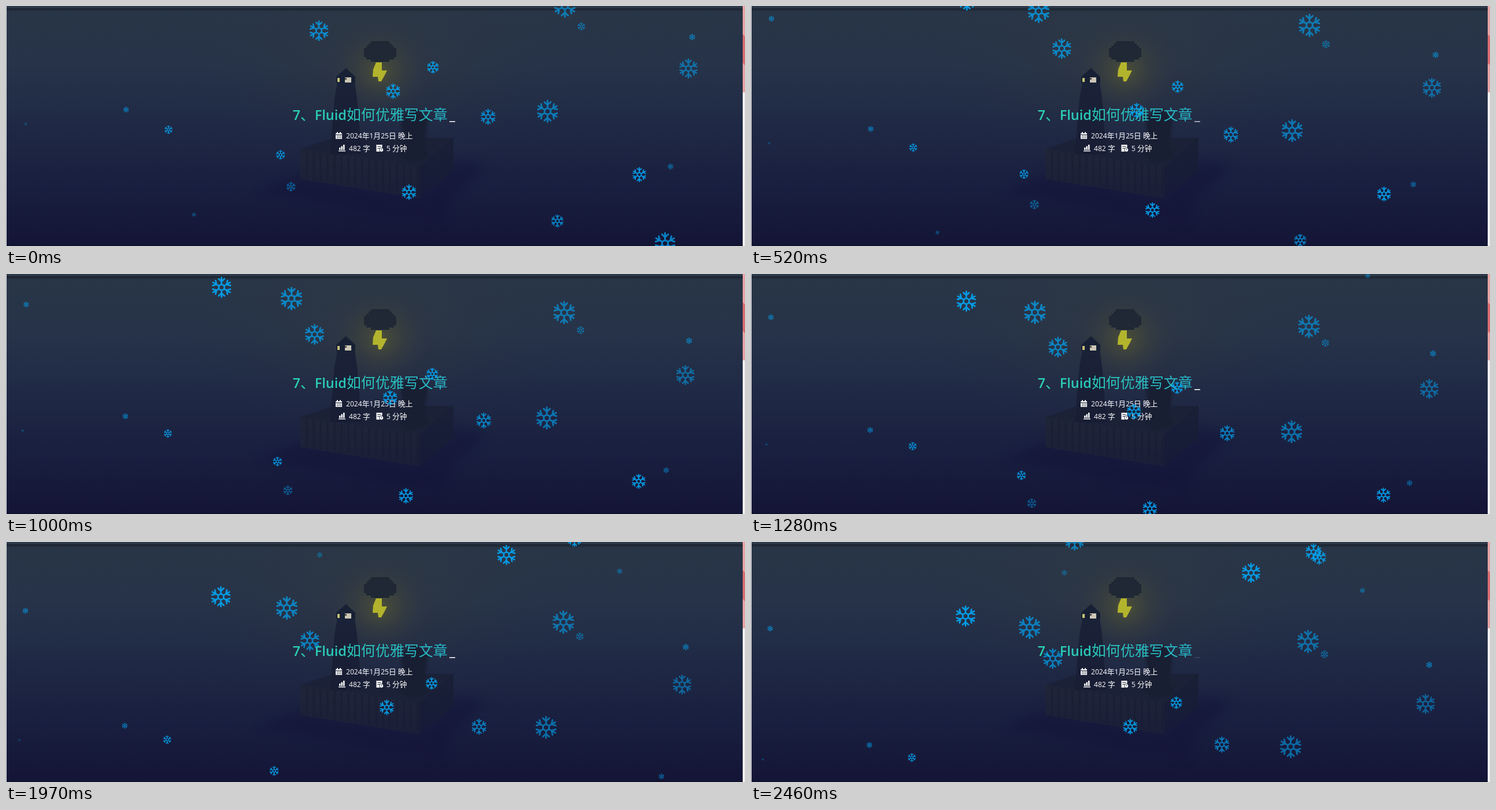
Animation, 1280 px wide and 417 px high, one loop 2530 ms. Source, as an HTML page with a canvas:

```html
<!DOCTYPE html>
<html lang="zh">
<head>
<meta charset="utf-8">
<title>Snow</title>
<style>
html, body { margin: 0; width: 100%; height: 100%; overflow: hidden; background: #1c2440; }
canvas { position: absolute; left: 0; top: 0; }
</style>
</head>
<body>
<canvas id="back" width="1280" height="417"></canvas>
<canvas id="front" width="1280" height="417"></canvas>
<script>
const W = 1280, H = 417, LOOP = 2530, STEPS = 37;
const back = document.getElementById('back').getContext('2d');
const front = document.getElementById('front').getContext('2d');

function rect(color, x, y, w, h) {
  back.fillStyle = color;
  back.fillRect(x, y, w, h);
}

function poly(color, ...p) {
  back.fillStyle = color;
  back.beginPath();
  for (let i = 0; i < p.length; i += 2) back.lineTo(p[i], p[i + 1]);
  back.fill();
}

function disc(color, x, y, r) {
  back.fillStyle = color;
  back.beginPath();
  back.arc(x, y, r, 0, 7);
  back.fill();
}

// Spreads the colours evenly along a gradient
function shade(gradient, ...colors) {
  colors.forEach((color, i) => gradient.addColorStop(i / (colors.length - 1), color));
  return gradient;
}

const vertical = (y0, y1, ...colors) => shade(back.createLinearGradient(0, y0, 0, y1), ...colors);

function glow(x, y, r, rgb, alpha, squash = 1) {
  back.save();
  back.translate(x, y);
  back.scale(1, squash);
  const falloff = [1, .55, .25, .08, 0].map(k => `rgba(${rgb},${alpha * k})`);
  rect(shade(back.createRadialGradient(0, 0, 0, 0, 0, r), ...falloff), -r, -r, 2 * r, 2 * r);
  back.restore();
}

function blurred(radius, ...shape) {
  back.filter = `blur(${radius}px)`;
  poly(...shape);
  back.filter = 'none';
}

// Latin and Chinese runs use their own font and size
function text(s, x, y, latin, chinese) {
  for (const run of s.match(/[\x00-\x7f]+|[^\x00-\x7f]+/g)) {
    back.font = run.charCodeAt(0) < 128 ? `${latin} "Open Sans", sans-serif`
      : `${chinese} "Noto Sans CJK SC", "Noto Sans CJK", sans-serif`;
    back.fillText(run, x, y);
    x += back.measureText(run).width;
  }
}

function drawSky() {
  rect(vertical(0, H, '#293647', '#263349', '#1f2945', '#191f3f', '#141536'), 0, 0, W, H);
  glow(645, 95, 330, '58,60,58', .45, .6);
  blurred(8, 'rgba(18,19,56,.45)', 440, 322, 512, 290, 716, 334, 776, 268, 832, 279, 775, 330, 755, 378, 640, 362);
  glow(648, 114, 82, '122,116,38', .42);
}

function drawIsland() {
  poly('#1b2238', 509, 249, 566, 229, 775, 229, 716, 279);
  poly(vertical(250, 334, '#1f2539', '#1a1f39'), 509, 249, 716, 279, 716, 334, 510, 301);
  poly(vertical(230, 334, '#192036', '#161a38'), 716, 279, 775, 228, 775, 285, 716, 334);
  for (let x = 519; x < 712; x += 12) rect('rgba(14,18,36,.16)', x, 250 + (x - 509) * .145, 4, 50);
  blurred(2, '#191f32', 684, 205, 690, 188, 712, 180, 731, 195, 724, 245, 733, 262, 700, 272, 680, 258, 690, 232);
}

function drawTower() {
  poly(vertical(130, 260, '#1a2238', '#181d34'), 574, 132, 604, 132, 608, 160, 616, 258, 561, 258, 569, 160);
  poly('#172034', 572, 123, 589, 108, 605, 123, 605, 134, 572, 134);
  rect('#c8c079', 574, 125, 4, 7);
  rect('#cbc6b5', 587, 124, 11, 9);
  rect('#514d45', 587, 125, 3, 3);
}

function drawCloud() {
  for (let y = 61; y < 98; y += 4) {
    const half = Math.round(29 * Math.sqrt(1 - ((y - 77.5) / 19) ** 2) / 4) * 4;
    rect('#1f2834', 648 - half, y, 2 * half, 4);
  }
  poly('#b3b42d', 641, 98, 651, 98, 651, 112, 660, 112, 655, 122, 650, 131, 645, 131, 644, 123, 635, 123, 636, 110);
}

function drawIcons() {
  const white = '#fff', dark = '#1c2337';
  rect(white, 571, 221, 11, 10);
  for (const x of [573, 578]) rect(white, x, 219, 2, 3);
  rect(dark, 571, 223, 11, 1);
  for (let i = 0; i < 6; i++) rect(dark, 573 + i % 3 * 3, 225 + (i > 2) * 3, 1.6, 1.6);

  rect(white, 576, 251, 12, 1.5);
  for (let i = 0; i < 3; i++) rect(white, 577 + i * 3.5, 246 - i * 2.5, 2.5, 4 + i * 2.5);

  rect(white, 641.5, 241, 10, 12);
  rect(dark, 643.5, 244, 6, 1);
  rect(dark, 643.5, 247, 4, 1);
  disc(dark, 650.3, 250, 3.8);
  disc(white, 650.3, 250, 3);
  rect(dark, 650, 248.3, 1, 2.2);
}

function drawText() {
  back.fillStyle = shade(back.createLinearGradient(497, 0, 765, 0), '#2bd3b2', '#27b3c6');
  text('7、Fluid如何优雅写文章', 496.5, 198, '600 23.4px', '300 25px');
  back.fillStyle = '#fff';
  const info = (s, x, y) => text(s, x, y, '400 12.1px', '400 12.8px');
  info('2024年1月25日 晚上', 589, 230);
  info('482 字', 594, 252);
  info('5 分钟', 659, 252);
}

function drawEdges() {
  rect('rgba(48,60,75,.5)', 0, 0, W, 4);
  rect(vertical(4, 10, 'rgba(8,14,24,.5)', 'rgba(8,14,24,0)'), 0, 4, W, 6);
  rect('rgba(8,10,24,.3)', 0, 415, W, 2);
  rect('#e8eaee', 0, 0, 1, H);
  rect('#f1eeee', 1276, 0, 4, H);
  rect('#e5a3a5', 1276, 0, 4, 150);
  poly('#d96c70', 1276, 49, 1280, 53, 1280, 103, 1276, 99);
}

// Layers share opacity and drift; each flake has a starting x, y and a size
const layers = [
  { alpha: .92, drift: -.08, flakes: [[281.5, 215, 15], [1097, 293, 26], [36, -9, 10], [374.5, -44, 37],
    [869, -106, 35], [208, 180, 10], [987, -133, 26], [739.5, 106.5, 22]] },
  { alpha: .9, drift: -.38, flakes: [[1188.5, 54, 11], [670.5, 148, 27], [698, 323.5, 27], [475.5, 258.5, 17], [988, -142, 30]] },
  { alpha: .77, drift: -.54, flakes: [[835, 192.5, 28], [955, 373.5, 23], [1151, 279, 10], [1078.5, -88.5, 9],
    [542, 43, 36], [502, -24.5, 41], [580, -162.5, 36], [1141.5, 412.5, 39]] },
  { alpha: .65, drift: -.09, flakes: [[996.5, 35.5, 14], [968, 0, 41], [546, -106, 10], [938, 183, 40]] },
  { alpha: .57, drift: -.38, flakes: [[325.5, 362.5, 7], [1182, 108.5, 35], [493.5, 314, 17], [34, 205, 4]] }
];

const crystal = new Path2D();
crystal.arc(0, 0, 13.5, 0, 7);
const arm = new Path2D('M0-14V-47M-14-41L0-28 14-41');
for (let i = 0; i < 6; i++) crystal.addPath(arm, new DOMMatrix().rotate(i * 60));

function drawFlake(x, y, size) {
  front.save();
  front.translate(x, y);
  front.scale(size / 102, size / 102);
  front.stroke(crystal);
  front.restore();
}

function cursorAlpha(t) {
  const phase = (t + 20) % 700 / 350, k = phase % 1;
  const eased = 1 - (1 - k ** 1.3) ** 2.9;
  return phase < 1 ? 1 - eased : eased;
}

function draw() {
  const t = performance.now() % LOOP;
  const step = Math.min(STEPS - 1, Math.floor(t * STEPS / LOOP + .35));
  front.clearRect(0, 0, W, H);
  front.globalAlpha = cursorAlpha(step * LOOP / STEPS);
  front.fillStyle = '#fff';
  front.fillRect(768, 200, 10, 1.6);
  front.strokeStyle = '#04a4f2';
  front.lineWidth = 7.5;
  front.lineCap = front.lineJoin = 'round';
  for (const { alpha, drift, flakes } of layers) {
    front.globalAlpha = alpha < .8 ? alpha - step * .002 : alpha;
    // Slow and fast flakes alternate
    flakes.forEach(([x, y, size], i) => drawFlake(x + drift * step, y + (i % 2 ? 4.8 : 4.43) * step, size));
  }
  requestAnimationFrame(draw);
}

drawSky();
drawIsland();
drawTower();
drawCloud();
drawIcons();
drawText();
drawEdges();
draw();
</script>
</body>
</html>
```
